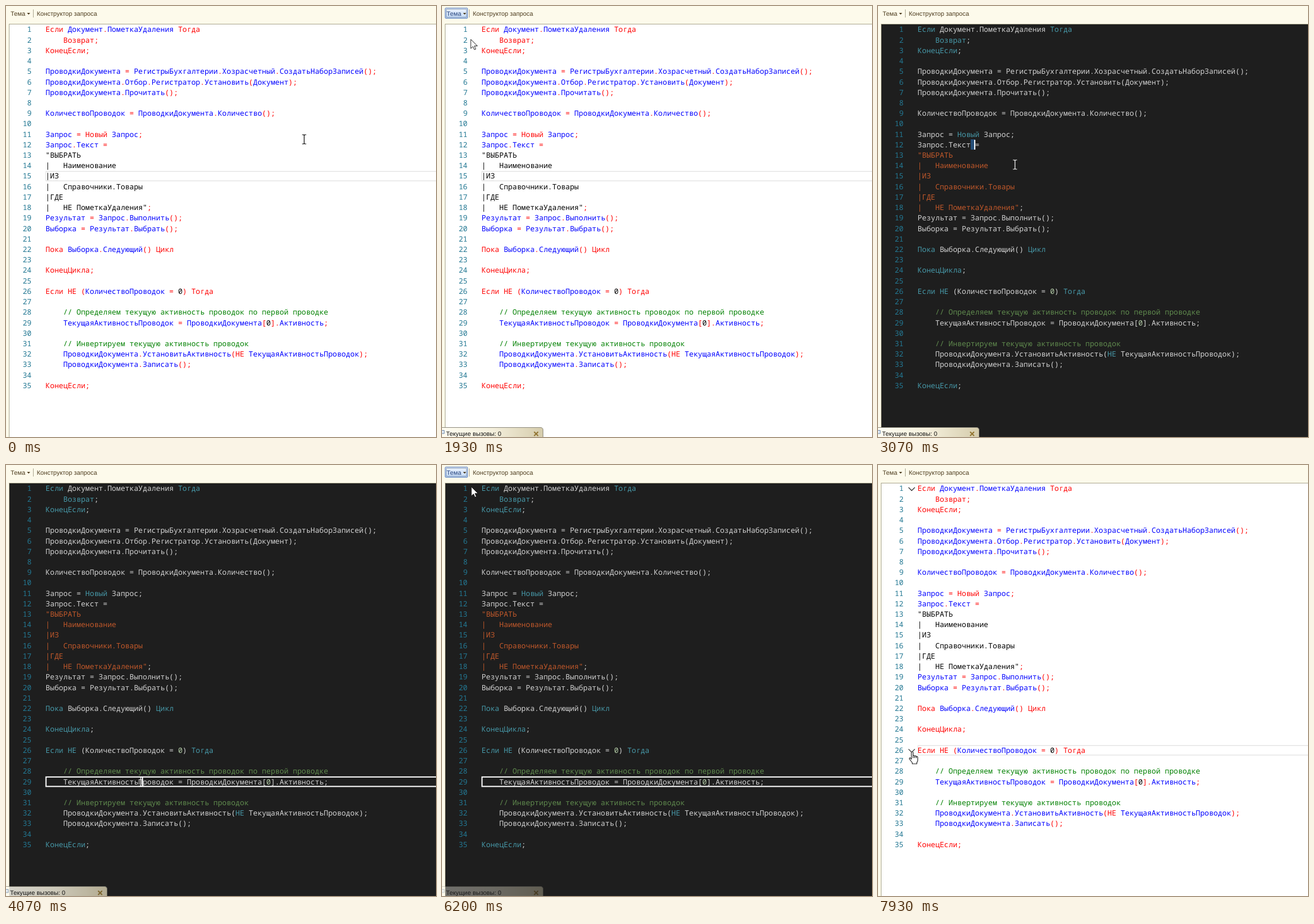
Write an HTML page that moves like this. It is 747x750 px and loops after 8 s.

```html
<!DOCTYPE html>
<html lang="ru">
<head>
<meta charset="utf-8">
<title>Редактор кода</title>
<style>
  html, body { margin: 0; width: 100%; height: 100%; overflow: hidden; background: #fdfaeb; }
  svg {
    display: block; width: 100%; height: 100%; text-rendering: geometricPrecision;
    --bg: #fff; --word: #00f; --key: #f00; --mark: #f00; --str: #000; --num: #000;
    --note: #008000; --gutter: #237893; --ink: #000; --frame: #e4e4e4; --chevron: #333;
  }
  svg.dark {
    --bg: #1e1e1e; --word: #d4d4d4; --key: #4799a9; --mark: #d4d4d4; --str: #c2592b; --num: #b5cea8;
    --note: #608b4e; --gutter: #237893; --ink: #fff; --frame: #fff; --chevron: #c5c5c5;
  }
  text { white-space: pre; font: 10.8px "Liberation Sans", Arial, sans-serif; fill: #4b3a1c; }
  .code text { font: 12.79px "Noto Sans Mono", monospace; }
  .word { fill: var(--word); } .key { fill: var(--key); } .mark { fill: var(--mark); }
  .str { fill: var(--str); } .num { fill: var(--num); } .note { fill: var(--note); }
  .code .gutter { fill: var(--gutter); text-anchor: end; }
  .chosen { fill: #213f78; }
</style>
</head>
<body>
<svg id="stage" viewBox="0 0 747 750">
  <defs>
    <linearGradient id="blue" x2="0" y2="1">
      <stop stop-color="#edf4fe"/><stop offset="1" stop-color="#c3daf7"/>
    </linearGradient>
    <linearGradient id="tan">
      <stop stop-color="#fffdf2"/><stop offset=".5" stop-color="#f4efdc"/><stop offset="1" stop-color="#d5ccac"/>
    </linearGradient>
  </defs>

  <rect width="747" height="750" fill="#fdfaeb"/>
  <rect x="5.5" y="31.5" width="760" height="740" fill="var(--bg)" stroke="#aaa68d"/>
  <rect id="selection" x="161" y="232" width="7.5" height="18" fill="#264f78"/>
  <rect id="lineFrame" x="69.5" width="700" height="16.5" fill="none" stroke="var(--frame)"/>
  <g id="code" class="code"></g>
  <g id="chevrons" fill="none" stroke="var(--chevron)" stroke-width="1.3">
    <path d="M53 39l5.5 5.5L64 39"/><path d="M53 494.4l5.5 5.5 5.5-5.5"/>
  </g>
  <rect id="caret" width="2" height="17" fill="var(--ink)"/>

  <g id="status">
    <path d="M-1 733.5H171Q175.500 733.5 175.500 738V752H-1Z" fill="url(#tan)" stroke="#8d897b"/>
    <path d="M0 738.500H4V744H0" fill="#e3ecf6" stroke="#6c87a8"/>
    <text x="7" y="747.500" style="fill:#111">Текущие вызовы: 0</text>
    <path d="M160 741l7 7m0-7l-7 7" stroke="#927532" stroke-width="2"/>
  </g>

  <g id="button">
    <rect x="5.500" y="3.500" width="39" height="18" rx="1.500" fill="url(#blue)" stroke="#5b7fbd"/>
    <rect x="7.500" y="5.500" width="35" height="14" fill="none" stroke="#27446f" stroke-dasharray="1 1"/>
  </g>
  <text id="theme" x="8" y="16.500">Тема</text>
  <path d="M36.500 12h5.500l-2.750 3z" fill="#4b3a1c"/>
  <path d="M47.500 6v14" stroke="#a9a48f"/>
  <text x="53.500" y="16.500">Конструктор запроса</text>

  <g id="menu">
    <rect x="8" y="28" width="105" height="44" opacity=".3"/>
    <rect x="5.500" y="25.500" width="105" height="44.500" fill="#fffefa" stroke="#c9c3ab"/>
    <rect x="6" y="26" width="24" height="43.500" fill="#eee6cb"/>
    <rect id="choice" x="7.500" width="102" height="20" rx="2" fill="url(#blue)" stroke="#8dafdd"/>
    <text id="lightItem" x="36" y="40.500">Светлая</text>
    <text id="darkItem" x="36" y="62.500">Темная</text>
  </g>

  <g id="beam" fill="none" stroke="var(--ink)" stroke-width="1.200">
    <path d="M-3.500-8H-1L0-7 1-8H3.500M0-7V7M-3.500 8H-1L0 7 1 8H3.500"/>
  </g>
  <path id="arrow" d="M0 0V16L3.800 12.500 6.300 18 8.700 17 6.300 11.500H11.500Z" fill="#fff" stroke="#222"/>
  <g id="hand" fill="#fff" stroke="#222" stroke-width="1.200" stroke-linejoin="round">
    <path d="M-1.500 1Q0-1.500 1.500 1V7Q3 5.500 4.200 7.500 6 6 7 8.500 9-.5 9.500 9.500V15Q9.500 17 8 18.500V21H0V19L-5 12.500Q-5.500 10-3 11L-1.500 13Z" visibility="hidden"/>
    <path d="M-1.500 1Q0-1.500 1.500 1V7Q3.200 5.700 4.200 7.500 6 6.300 7 8.300 9.300 7.500 9.500 10V15Q9.500 17 8 18.500V21H0V19L-5 12.500Q-5.300 9.800-3 11L-1.500 13ZM1.500 7v4M4.200 7.500V11M7 8.300V11"/>
  </g>
</svg>
<script>
const source = `Если Документ.ПометкаУдаления Тогда
    Возврат;
КонецЕсли;

ПроводкиДокумента = РегистрыБухгалтерии.Хозрасчетный.СоздатьНаборЗаписей();
ПроводкиДокумента.Отбор.Регистратор.Установить(Документ);
ПроводкиДокумента.Прочитать();

КоличествоПроводок = ПроводкиДокумента.Количество();

Запрос = Новый Запрос;
Запрос.Текст =
"ВЫБРАТЬ
|   Наименование
|ИЗ
|   Справочники.Товары
|ГДЕ
|   НЕ ПометкаУдаления";
Результат = Запрос.Выполнить();
Выборка = Результат.Выбрать();

Пока Выборка.Следующий() Цикл

КонецЦикла;

Если НЕ (КоличествоПроводок = 0) Тогда

    // Определяем текущую активность проводок по первой проводке
    ТекущаяАктивностьПроводок = ПроводкиДокумента[0].Активность;

    // Инвертируем текущую активность проводок
    ПроводкиДокумента.УстановитьАктивность(НЕ ТекущаяАктивностьПроводок);
    ПроводкиДокумента.Записать();

КонецЕсли;`;

const LOOP = 8000, STEP = 200 / 3, CHAR = 7.674, LEFT = 68.8;
const keywords = new Set("Если Тогда Возврат КонецЕсли Новый Пока Цикл КонецЦикла НЕ".split(" "));
const $ = id => document.getElementById(id);
const lineY = n => 41 + 18.22 * (n - 1);
const between = (t, a, b) => t >= a && t < b;
const clamp = v => Math.min(1, Math.max(0, v));
const show = (id, on) => $(id).style.display = on ? "" : "none";

function tokenClass(token) {
  if (token.startsWith("//")) return "note";
  if (/^["|]/.test(token)) return "str";
  if (keywords.has(token)) return "key";
  if (/^\d/.test(token)) return "num";
  return /^[а-яё]/i.test(token) ? "word" : "mark";
}

const tokenPattern = /\/\/.*|^["|][^"]*"?|[а-яё]+|\d+|\s+|./gi;
$("code").innerHTML = source.split("\n").map((line, i) => {
  const y = lineY(i + 1) + 4.4;
  const spans = line.replace(tokenPattern, s => `<tspan class="${tokenClass(s)}">${s}</tspan>`);
  return `<text class="gutter" x="44.3" y="${y}">${i + 1}</text><text x="${LEFT}" y="${y}">${spans}</text>`;
}).join("");

// Pointer path: time, x, y
const path = [
  [0, 518, 232], [800, 44, 27], [930, 35, 12], [1500, 35, 12], [1730, 52, 52], [1870, 50, 58],
  [2000, 50, 58], [2200, 130, 174], [2440, 130, 174], [2700, 165, 241], [2900, 165, 241],
  [3067, 238, 276], [3330, 245, 193], [3850, 234, 551], [4130, 234, 551], [4800, 35, 12],
  [5030, 35, 12], [5400, 51, 38], [6800, 51, 38], [7260, 150, 497], [7400, 150, 497],
  [7600, 59.5, 499], [LOOP, 59.5, 499]
];
// Caret: from, until, column, line
const carets = [[2800, 3950, 13, 12], [3950, 4730, 22, 29], [6260, 7260, 22, 29], [7260, LOOP, 10, 26]];
const gutterVisits = [[760, 870], [2000, 2070], [6200, 6800], [7500, 8400]];

function pointerAt(t) {
  const i = path.findIndex(p => p[0] > t);
  const [t0, x0, y0] = path[i - 1], [t1, x1, y1] = path[i];
  const k = (t - t0) / (t1 - t0), e = k * k * (3 - 2 * k);
  return [x0 + (x1 - x0) * e, y0 + (y1 - y0) * e];
}

function drawPointer(t, popup) {
  const [x, y] = pointerAt(t);
  const onChevron = x > 45 && x < 68 && [1, 26].some(n => Math.abs(y - lineY(n)) < 9);
  const shape = popup || y < 31 ? "arrow" : x >= 69 ? "beam" : onChevron ? "hand" : "arrow";
  for (const id of ["arrow", "beam", "hand"]) show(id, id === shape);
  $(shape).setAttribute("transform", `translate(${x} ${y})`);
}

function draw(t) {
  const dark = between(t, 1990, 6260);
  const active = between(t, 925, 1990) || between(t, 4730, 6260);
  $("stage").classList.toggle("dark", dark);
  show("button", active);
  $("theme").classList.toggle("chosen", active);

  const second = between(t, 1650, 1990);
  show("menu", between(t, 1060, 1865) || between(t, 4795, 6130));
  $("choice").setAttribute("y", second ? 48.5 : 26);
  $("lightItem").classList.toggle("chosen", !second);
  $("darkItem").classList.toggle("chosen", second);

  const line = t < 2800 ? 15 : t < 3950 ? 0 : t < 7260 ? 29 : 26;
  show("lineFrame", line);
  $("lineFrame").setAttribute("y", lineY(line) - 8.3);
  $("lineFrame").setAttribute("stroke-width", dark ? 2 : 1.4);
  show("selection", between(t, 2800, 3950));

  const caret = carets.find(([from, until]) => between(t, from, until));
  show("caret", caret && (t - caret[0]) % 1000 < 500);
  if (caret) {
    $("caret").setAttribute("x", LEFT + caret[2] * CHAR - 1.5);
    $("caret").setAttribute("y", lineY(caret[3]) - 8.5);
  }

  const fades = gutterVisits.map(([from, until]) =>
    clamp(Math.min(t - from, until - from, 400) / 400 - Math.max(0, t - until) / 400));
  $("chevrons").style.opacity = Math.max(...fades);
  $("status").style.opacity = t < 1060 ? 0 : clamp(1 - (t - 3200) / 4730);
  drawPointer(t, active);
}

function tick() {
  const t = performance.now() % LOOP;
  draw(Math.min(LOOP - 1, Math.floor((t + 4) / STEP) * STEP));
  requestAnimationFrame(tick);
}
tick();
</script>
</body>
</html>
```
